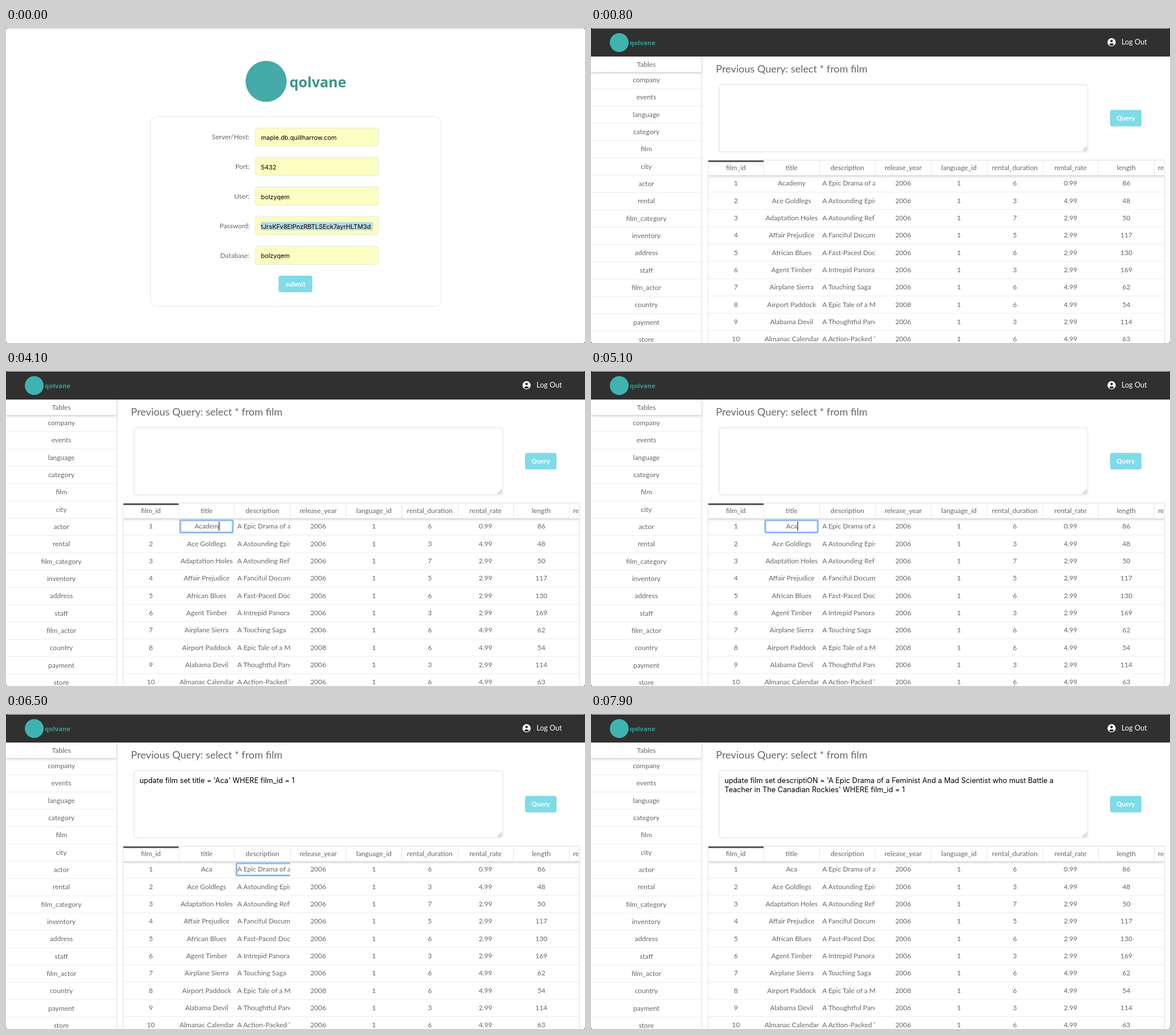
Animation of 1015x552 px, one loop 8 s. Source, as an HTML page:

```html
<!DOCTYPE html>
<html lang="en">
<head>
<meta charset="utf-8">
<title>Query console</title>
<style>
  html, body { margin: 0; width: 100%; height: 100%; overflow: hidden; background: #fff; }
  svg { display: block; width: 100vw; height: 100vh; }
  text { font: 12px Lato, sans-serif; fill: #666; white-space: pre; }
  .mid { text-anchor: middle; }
  .end { text-anchor: end; font-size: 11.8px; }
  .heading { font-size: 18px; }
  .input { font: 10.9px Inter, sans-serif; fill: #000; }
  .query { font: 12.7px Inter, sans-serif; fill: #000; }
  .button { font-size: 11.6px; font-weight: bold; fill: #fff; text-anchor: middle; }
  .brand { font: bold 25px "Noto Sans", sans-serif; fill: #3c9488; }
  .brand.small { font-size: 11.3px; fill: #3a9c94; }
  .white { font-size: 12.6px; fill: #fff; }
  .shadow { filter: drop-shadow(0 2px 2px #0003); }
</style>
</head>
<body>
<svg id="stage" viewBox="0 0 1015 552">
  <clipPath id="descriptionClip"><rect x="401" y="258" width="97" height="294"/></clipPath>
  <clipPath id="tableClip"><rect x="205" y="231" width="800.5" height="321"/></clipPath>
  <clipPath id="passwordClip"><rect x="447" y="335" width="196" height="26"/></clipPath>
  <rect width="1015" height="552" fill="#fff"/>
  <g id="login"></g>
  <g id="app"></g>
  <rect width="1015" height="1" fill="#cfcfcf"/>
  <path d="M0 0h3q-3 0-3 3zM1015 0h-3q3 0 3 3zM0 552h3q-3 0-3-3zM1015 552h-3q3 0 3-3z" fill="#222"/>
</svg>
<script>
const LOOP = 8000;
const ROW = 30.33, COLUMN = 97.8, TABLE_X = 205;
const byId = id => document.getElementById(id);

const text = (x, y, value, cls = '', extra = '') =>
  `<text x="${x}" y="${y}" class="${cls}" ${extra}>${value}</text>`;
const box = (x, y, w, h, fill, stroke = 'none', r = 0, extra = '') =>
  `<rect x="${x}" y="${y}" width="${w}" height="${h}" rx="${r}" fill="${fill}" stroke="${stroke}" ${extra}/>`;
const line = (x1, y1, x2, y2, color = '#ececec', extra = '') =>
  `<path d="M${x1} ${y1}L${x2} ${y2}" stroke="${color}" ${extra}/>`;
const button = (x, y, w, label) =>
  box(x, y, w, 29, '#7fdbe6', 'none', 3.5) + text(x + w / 2, y + 18.7, label, 'button');
const ring = (id, x, w, extra = '') =>
  `<g id="${id}" ${extra}>${box(x, 261.5, w, 21.5, 'none', '#c6dcf7', 2, 'stroke-width="4"')}` +
  `${box(x, 261.5, w, 21.5, 'none', '#86b2ec', 1, 'stroke-width="2"')}</g>`;

function buildLogin() {
  const fields = [
    ['Server/Host:', 'maple.db.quillharrow.com'],
    ['Port:', '5432'],
    ['User:', 'bolzyqem'],
    ['Password:', 'tJrsKFv8ElPnzRBTLSEck7ayrHLTM3d'],
    ['Database:', 'bolzyqem'],
  ];
  let out = '<circle cx="456" cy="93.5" r="36" fill="#45aaa8"/>' +
    text(497, 104, 'qolvane', 'brand') +
    box(253.5, 155, 509, 333, '#fff', '#e6e6e6', 10);
  fields.forEach(([label, value], i) => {
    const y = 175.5 + i * 51.9;
    const isPassword = label === 'Password:';
    out += text(427, y + 19.5, label, 'end') +
      box(437, Math.round(y) - .5, 216, 32, '#fbfec2', '#e9ebd8', 3.5);
    if (isPassword) out += box(447, y + 9, 196, 14, '#b4d7e2', 'none', 0, 'id="selection"');
    out += text(447, y + 20.3, value, 'input', isPassword ? 'clip-path="url(#passwordClip)"' : '');
  });
  return out + button(478, 434, 59, 'submit');
}

function buildSidebar() {
  const tables = ['company', 'events', 'language', 'category', 'film', 'city', 'actor', 'rental',
    'film_category', 'inventory', 'address', 'staff', 'film_actor', 'country', 'payment', 'store'];
  const rows = tables.map((name, i) =>
    text(97, 95 + i * ROW, name, 'mid') + line(0, 106.4 + i * ROW, 194, 106.4 + i * ROW));
  return rows.join('') + box(0, 50, 194, 27, '#fff', 'none', 0, 'class="shadow"') +
    text(97, 67.5, 'Tables', 'mid') + line(194.2, 50, 194.2, 552, '#dcdcdc');
}

function buildTable() {
  const columns = ['film_id', 'title', 'description', 'release_year', 'language_id',
    'rental_duration', 'rental_rate', 'length'];
  const films = [
    ['Academy', 'A Epic Drama of a Feminist', 2006, 6, '0.99', 86],
    ['Ace Goldlegs', 'A Astounding Epistle', 2006, 3, '4.99', 48],
    ['Adaptation Holes', 'A Astounding Reflection', 2006, 7, '2.99', 50],
    ['Affair Prejudice', 'A Fanciful Documentary', 2006, 5, '2.99', 117],
    ['African Blues', 'A Fast-Paced Documentary', 2006, 6, '2.99', 130],
    ['Agent Timber', 'A Intrepid Panorama', 2006, 3, '2.99', 169],
    ['Airplane Sierra', 'A Touching Saga', 2006, 6, '4.99', 62],
    ['Airport Paddock', 'A Epic Tale of a Moose', 2008, 6, '4.99', 54],
    ['Alabama Devil', 'A Thoughtful Panorama', 2006, 3, '2.99', 114],
    ['Almanac Calendar', 'A Action-Packed Tale', 2006, 6, '4.99', 63],
  ];
  const center = i => TABLE_X + COLUMN * (i + .5);
  let out = '';
  films.forEach(([title, description, year, duration, rate, length], i) => {
    const y = 276.3 + i * ROW;
    [i + 1, title, null, year, 1, duration, rate, length].forEach((value, c) => {
      if (value !== null)
        out += text(center(c), y, value, 'mid', i === 0 && c === 1 ? 'id="title"' : '');
    });
    out += text(405.5, y, description, '', 'clip-path="url(#descriptionClip)"') +
      line(TABLE_X, y + 11.4, 1006, y + 11.4);
  });
  out += box(TABLE_X, 232, 801, 26, '#fff', 'none', 0, 'class="shadow"') +
    line(TABLE_X, 231.5, 1006, 231.5, '#ddd');
  columns.forEach((name, i) => {
    const x = TABLE_X + COLUMN * (i + 1);
    out += text(center(i), 248.7, name, 'mid') + line(x, 232, x, 258, '#e6e6e6');
  });
  out += text(994, 248.7, 'replacement_cost') + box(TABLE_X, 232, 97.5, 3, '#58595b');
  return `<g clip-path="url(#tableClip)">${out}</g>` +
    line(205.3, 232, 205.3, 552, '#e0e0e0') + line(1005.5, 232, 1005.5, 552, '#e0e0e0');
}

function buildApp() {
  const header = box(0, 0, 1015, 50, '#303030') +
    '<circle cx="49.5" cy="25.5" r="16.5" fill="#3fb3b1"/>' +
    text(68, 30, 'qolvane', 'brand small') +
    '<circle cx="912.6" cy="25" r="7.2" fill="#fff"/>' +
    '<circle cx="912.6" cy="22.7" r="2.2" fill="#303030"/>' +
    '<path d="M908.2 28.7q4.4-4 8.8 0q-4.4 4.6-8.8 0z" fill="#303030"/>' +
    text(930, 29, 'Log Out', 'white');
  const editor = text(219, 77.5, 'Previous Query: select * from film', 'heading') +
    box(224.5, 99.5, 646.5, 117.5, '#fff', '#dedede', 3) +
    line(862, 215.5, 869.5, 208, '#777') + line(866, 215.5, 869.5, 212, '#777') +
    text(234, 121, '', 'query', 'id="query1"') + text(234, 136.5, '', 'query', 'id="query2"') +
    button(910, 143.5, 55, 'Query');
  return buildSidebar() + editor + buildTable() + header +
    ring('titleRing', 305.5, 92) +
    ring('descriptionRing', 404, 110, 'clip-path="url(#descriptionClip)"') +
    box(0, 0, 1, 16, '#000', 'none', 0, 'id="caret"');
}

byId('login').innerHTML = buildLogin();
byId('app').innerHTML = buildApp();

const show = (id, on) => byId(id).style.display = on ? '' : 'none';
const between = (t, from, to) => t >= from && t < to;
const setText = (id, value) => {
  const node = byId(id);
  if (node.textContent !== value) node.textContent = value;
  return node.getComputedTextLength();
};

function render(t) {
  show('selection', t < 100);
  show('login', t < 800);
  show('app', t >= 800);
  show('titleRing', between(t, 3100, 5600));
  show('descriptionRing', between(t, 5600, 6700));

  // One letter is deleted every 100 ms, from 4100 to 4400.
  const deleted = Math.min(4, Math.max(0, Math.floor((t - 4000) / 100)));
  const titleWidth = setText('title', 'Academy'.slice(0, 7 - deleted));

  const secondQuery = t >= 7300;
  const width1 = setText('query1', t < 6500 ? '' : secondQuery
    ? "update film set descriptiON = 'A Epic Drama of a Feminist And a Mad Scientist who must Battle a"
    : "update film set title = 'Aca' WHERE film_id = 1");
  const width2 = setText('query2', secondQuery ? "Teacher in The Canadian Rockies' WHERE film_id = 1" : '');

  let caret = null;
  if (between(t, 3100, 3600) || between(t, 4000, 4600) || between(t, 5100, 5600))
    caret = [351.7 + titleWidth / 2, 264];
  else if (between(t, 5600, 6200)) caret = [406, 264];
  else if (between(t, 6700, 7200)) caret = [234 + width1, 109];
  else if (between(t, 7300, 7900)) caret = [234 + width2, 124];
  show('caret', caret);
  if (caret) {
    byId('caret').setAttribute('x', Math.round(caret[0]));
    byId('caret').setAttribute('y', caret[1]);
  }
}

function tick() {
  render(performance.now() % LOOP);
  requestAnimationFrame(tick);
}
tick();
</script>
</body>
</html>
```
